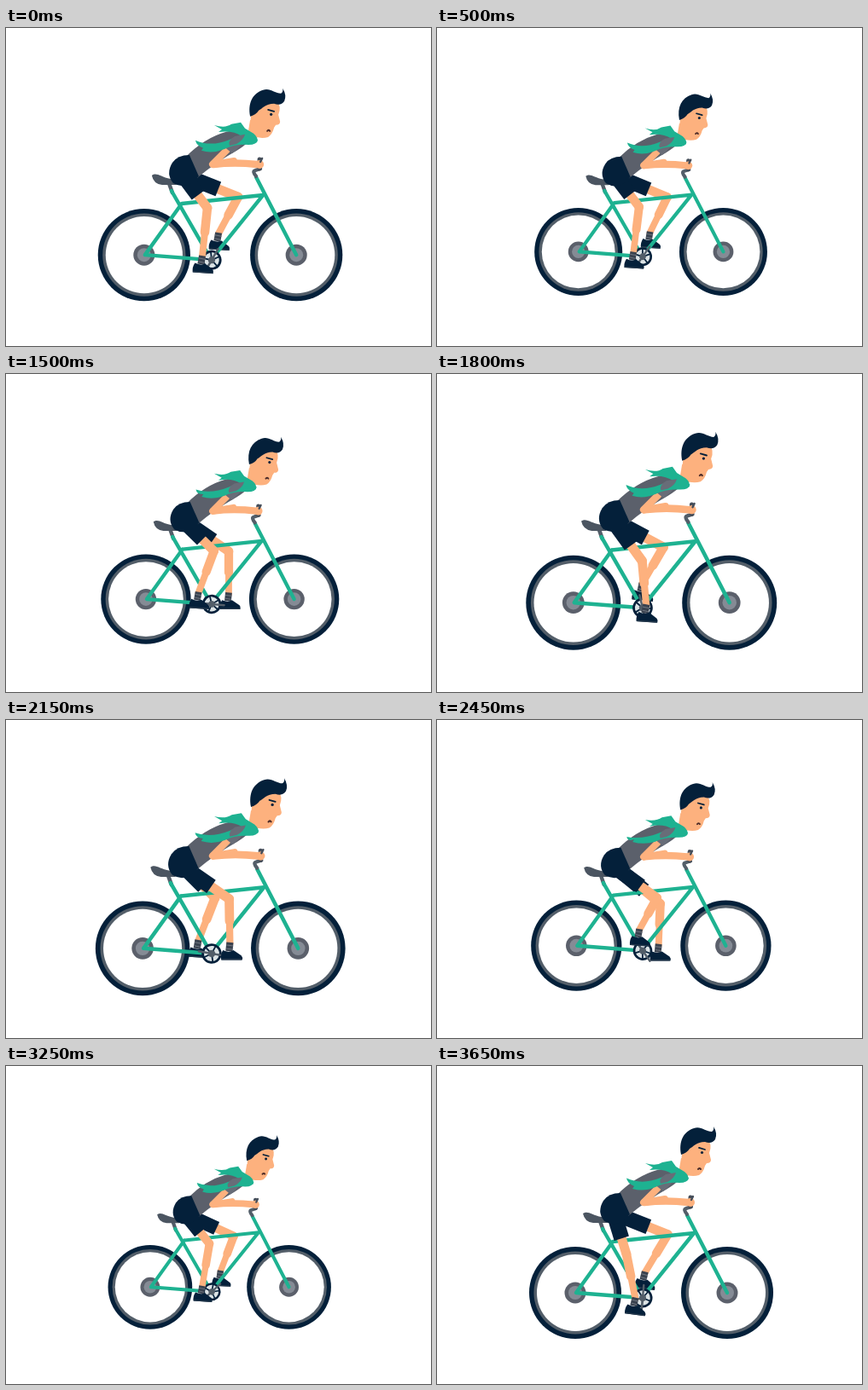
Write an HTML page with a canvas that moves like this. It is 498 by 373 pixels and loops after 3.7 s.

```html
<!DOCTYPE html>
<html lang="en">
<head>
<meta charset="utf-8">
<title>Cyclist</title>
<style>
  html, body { margin: 0; width: 100%; height: 100%; overflow: hidden; background: #fff; }
  canvas { display: block; width: 498px; height: 373px; }
</style>
</head>
<body>
<canvas id="stage"></canvas>
<script>
const W = 498, H = 373, LOOP = 3700, STEP = 50;
const NAVY = '#04203a', GREY = '#5b606b', STEEL = '#535e69', GREEN = '#1eb291', SKIN = '#fdb17e';

// time, zoom at each turning point
const ZOOM = [[0, 1.002], [1010, .904], [1930, 1.034], [3140, .905], [3700, 1.002]];
// time, near crank angle (eight turns per loop)
const CRANK = [[0, 120], [500, 485], [1100, 955], [1500, 1265], [2150, 1810], [2750, 2260], [3650, 2975], [3700, 3000]];
// crank angle, knee x y, ankle x y, foot tilt
const LEG = [
  [-60, 272, 198, 249, 241, 4], [8, 261, 209, 262, 260, 0], [55, 262, 216, 260, 265, 0],
  [97, 220, 221, 231, 273, 8], [120, 236, 211, 230, 268, 4], [187, 244, 208, 225, 258, 4],
  [235, 258, 209, 237, 247, 4], [277, 271, 197, 244, 242, 8], [300, 272, 198, 249, 241, 4]
];

const canvas = document.getElementById('stage');
const ctx = canvas.getContext('2d');
const dpr = window.devicePixelRatio || 1;
canvas.width = W * dpr;
canvas.height = H * dpr;

const smooth = u => (1 - Math.cos(Math.PI * u)) / 2;

function sample(keys, x, ease = u => u) {
  let i = 1;
  while (i < keys.length - 1 && x > keys[i][0]) i++;
  const a = keys[i - 1], b = keys[i];
  const u = ease((x - a[0]) / (b[0] - a[0]));
  return a.slice(1).map((v, n) => v + (b[n + 1] - v) * u);
}

function fill(path, color) {
  ctx.fillStyle = color;
  ctx.fill(new Path2D(path));
}

function stroke(path, color, width, cap = 'round') {
  ctx.strokeStyle = color;
  ctx.lineWidth = width;
  ctx.lineCap = cap;
  ctx.lineJoin = 'round';
  ctx.stroke(new Path2D(path));
}

function disc(x, y, r, color) {
  ctx.fillStyle = color;
  ctx.beginPath();
  ctx.arc(x, y, r, 0, 2 * Math.PI);
  ctx.fill();
}

function wheel(x, y) {
  disc(x, y, 54, NAVY);
  disc(x, y, 48.5, STEEL);
  disc(x, y, 45, '#fff');
  disc(x, y, 12.5, GREY);
  disc(x, y, 8, '#858b95');
}

function leg(angle, hipX, hipY) {
  const turn = ((angle + 60) % 360 + 360) % 360 - 60;
  const [kx, ky, ax, ay, tilt] = sample(LEG, turn);
  const hemX = hipX + (kx - hipX) * .62, hemY = hipY + (ky - hipY) * .62;

  stroke(`M${hemX},${hemY}L${kx},${ky}`, SKIN, 11);
  stroke(`M${kx},${ky}L${(kx + ax) / 2},${(ky + ay) / 2}`, SKIN, 10.5);
  stroke(`M${kx},${ky}L${ax},${ay}`, SKIN, 8);
  stroke(`M${hipX},${hipY}L${hemX},${hemY}`, NAVY, 18, 'butt');

  ctx.save();
  ctx.translate(ax, ay);
  ctx.rotate(tilt * Math.PI / 180);
  stroke('M0,-1L-1,9', '#39424f', 8, 'butt');
  stroke('M-4,2L4,3M-4,6L3,7', '#7d838c', .8, 'butt');
  fill('M-8,8Q-1,11 4,8L13,14Q15,16 14,19L-10,19Q-11,13 -8,8Z', NAVY);
  stroke('M-9,18.3L13,18.3', '#26394c', 1.4);
  ctx.restore();
}

function crank(angle) {
  ctx.save();
  ctx.translate(241, 272);
  ctx.rotate(angle * Math.PI / 180);
  disc(0, 0, 11.5, NAVY);
  disc(0, 0, 8.8, '#dce3e5');
  for (let i = 0; i < 5; i++) {
    ctx.rotate(2 * Math.PI / 5);
    stroke('M0,0L9,0', NAVY, 1.8);
  }
  disc(0, 0, 4, STEEL);
  stroke('M-15,0L15,0', STEEL, 2.4);
  ctx.restore();
}

function bike() {
  stroke('M191,182L195,193', STEEL, 4.5);
  stroke('M194,191L236,264M206,206L163,266L240,272L301,196L206,206', GREEN, 4.4);
  stroke('M293,175L340,266', GREEN, 4.4);
  stroke('M293,174Q288,168 292,167L298,165', STEEL, 4.2);
  fill('M171,173C177,169 181,175 193,177L200,178Q204,182 199,184L183,184Q173,183 171,173Z', '#4b5561');
}

function torso() {
  fill('M211,151Q233,129 258,122Q276,117 287,126Q288,133 270,144Q245,158 224,176Z', GREY);
  fill('M215,149Q201,149 195,158Q187,171 196,182Q208,189 219,181L226,174Z', NAVY);
}

function arm() {
  stroke('M297,165L297,154', '#454e5a', 5);
  stroke('M259,143L242,160', SKIN, 8);
  stroke('M243,160L267,156', SKIN, 8);
  stroke('M243,160Q268,157 294,160', SKIN, 8.5);
  disc(297, 160, 5, SKIN);
  stroke('M298,157L300,153', '#454e5a', 2.4);
  fill('M254,138Q267,124 281,127Q276,139 265,147Z', '#686d78');
}

function head() {
  fill('M286,108L283,126Q289,132 295,128L300,112Z', SKIN);
  fill('M291,93L317,86Q323,92 319,102L321,110Q321,114 316,114L314,117Q312,125 307,128Q297,131 285,125L287,103Z', SKIN);
  fill('M286,104C283,88 289,77 301,73C309,70 315,77 322,77Q325,75 324,71Q329,79 326,86Q322,92 314,89C304,89 300,95 296,97Q293,102 286,104Z', NAVY);
  stroke('M307,96L314,98', NAVY, 1.8);
  disc(310.5, 101.5, 1.6, NAVY);
  stroke('M306,121Q308,119 309,121', '#4c2b28', 2);
}

function scarf(sway) {
  const y = 134 - 2.5 * sway, dip = 143 + sway;
  fill(`M222,${y}Q240,140 262,131L282,125L295,131Q294,137 284,137Q267,136 256,142Q242,${dip + 4} 229,${dip}L231,${dip - 3}Q223,${y + 6} 222,${y}Z`, GREEN);
  const top = 115 - sway;
  fill(`M244,${top}Q257,118 264,113L275,111L280,118L290,124Q296,129 294,134Q284,136 276,127Q266,120 249,${top + 8}L253,${top + 5}Z`, GREEN);
  fill('M262,138Q259,133 268,127L280,125Q278,132 270,136Z', '#686d78');
}

function draw(t) {
  const [zoom] = sample(ZOOM, t, smooth);
  const [angle] = sample(CRANK, t);
  ctx.setTransform(dpr, 0, 0, dpr, 0, 0);
  ctx.fillStyle = '#fff';
  ctx.fillRect(0, 0, W, H);
  ctx.translate(242, 188);
  ctx.scale(zoom, zoom);
  ctx.translate(-242, -188);

  wheel(162, 266);
  wheel(340, 266);
  leg(angle + 180, 211, 174);
  bike();
  crank(angle);
  leg(angle, 207, 172);
  torso();
  head();
  arm();
  scarf(Math.sin(angle * Math.PI / 180));
}

const start = performance.now();
function tick() {
  const t = (performance.now() - start) % LOOP;
  draw(Math.floor(t / STEP) * STEP);
  requestAnimationFrame(tick);
}
tick();
</script>
</body>
</html>
```
